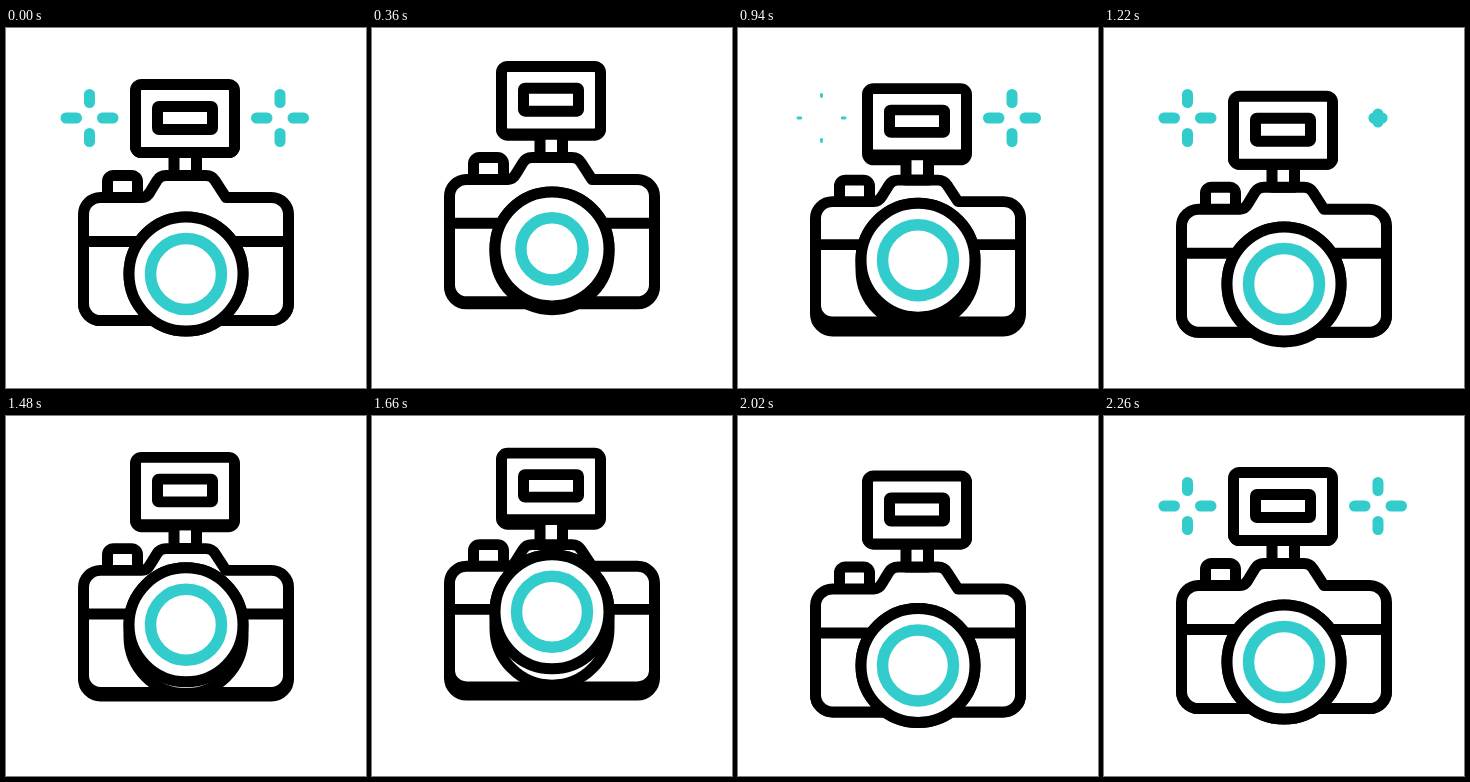
An HTML page with a canvas that plays this animation: 360 by 360 pixels, repeating every 2.42 s.

```html
<!DOCTYPE html>
<html lang="en">
<head>
<meta charset="utf-8">
<title>Camera</title>
<style>
  html, body { margin: 0; height: 100%; overflow: hidden; background: #fff; }
  canvas { display: block; width: 100vmin; height: 100vmin; }
</style>
</head>
<body>
<canvas width="360" height="360"></canvas>
<script>
const ctx = document.querySelector('canvas').getContext('2d');
const LOOP = 2420, TEAL = '#33cccc', STROKE = 11;

// Keys are [time, value] pairs.
const lift = [[0, 0], [360, -18], [540, -35], [600, -37], [680, -33], [940, 4], [1150, 14],
  [1480, -15], [1585, -26], [1640, -22], [1820, 7], [1900, 7], [2140, 0], [LOOP, 0]];
const depth = [[0, 0], [360, 2], [540, 18], [660, 25], [680, 25], [940, 9], [1150, 0],
  [1480, 3.5], [1590, 9], [1820, 4], [1960, 0], [LOOP, 0]];
const zoom = [[0, 0], [360, 7], [540, 36], [660, 50], [680, 50], [940, 18], [1150, 0],
  [1480, 22], [1600, 34], [1820, 12], [1960, 0], [LOOP, 0]];
const focus = [[0, 35.5], [340, 31], [540, 35.5], [LOOP, 35.5]];
const flash = [[0, 0], [580, 0], [700, 1], [730, 1], [840, 0], [LOOP, 0]];

// Each burst is [start, end].
const leftBursts = [[-500, 40], [656, 860], [1080, 1240], [2040, 9999]];
const rightBursts = [[-500, 40], [800, 1000], [1200, 1360], [2040, 9999]];

const clamp = x => Math.min(1, Math.max(0, x));

// Cubic interpolation that stays flat at peaks and holds.
function sample(keys, t) {
  const i = Math.max(1, keys.findIndex(k => k[0] >= t));
  const slope = j => {
    if (j < 1 || j > keys.length - 2) return 0;
    const [a, b, c] = [keys[j - 1], keys[j], keys[j + 1]];
    const before = (b[1] - a[1]) / (b[0] - a[0]), after = (c[1] - b[1]) / (c[0] - b[0]);
    return before * after > 0 ? 2 * before * after / (before + after) : 0;
  };
  const [t0, v0] = keys[i - 1], [t1, v1] = keys[i];
  const span = t1 - t0, u = (t - t0) / span, w = 1 - u;
  return v0 * (1 + 2 * u) * w * w + slope(i - 1) * span * u * w * w
    + v1 * u * u * (3 - 2 * u) - slope(i) * span * u * u * w;
}

function paint(path, color = '#000', fill = '#fff', width = STROKE) {
  ctx.lineWidth = width;
  ctx.strokeStyle = color;
  ctx.beginPath();
  path();
  if (fill) {
    ctx.fillStyle = fill;
    ctx.fill();
  }
  ctx.stroke();
}

function box(left, top, right, bottom, radius, color) {
  paint(() => ctx.roundRect(left, top, right - left, bottom - top, radius), color);
}

function line(x1, y1, x2, y2, color, width) {
  paint(() => { ctx.moveTo(x1, y1); ctx.lineTo(x2, y2); }, color, null, width);
}

function squash(top, offset, scale, draw) {
  ctx.save();
  ctx.translate(0, top + offset);
  ctx.scale(1, scale);
  ctx.translate(0, -top);
  draw();
  ctx.restore();
}

function bodyPath() {
  ctx.moveTo(95, 169.5);
  ctx.lineTo(136, 169.5);
  ctx.quadraticCurveTo(141, 169.5, 144, 164);
  ctx.lineTo(151, 152.5);
  ctx.quadraticCurveTo(154, 147.5, 160, 147.5);
  ctx.lineTo(200, 147.5);
  ctx.quadraticCurveTo(206, 147.5, 209, 152.5);
  ctx.lineTo(220, 169.5);
  ctx.lineTo(265, 169.5);
  ctx.arcTo(282.5, 169.5, 282.5, 187, 17);
  ctx.arcTo(282.5, 292.5, 265, 292.5, 17);
  ctx.arcTo(77.5, 292.5, 77.5, 275, 17);
  ctx.arcTo(77.5, 169.5, 95, 169.5, 17);
  ctx.closePath();
}

function drawBody(y, e) {
  const scale = 1 - e * 0.0024;
  const bottom = 169.5 + y + 123 * scale;
  box(77.5, 195 + y, 282.5, bottom + e, 17);
  squash(169.5, y, scale, () => {
    box(101.5, 147.5, 131.5, 172, [6, 6, 0, 0]);
    paint(bodyPath);
    line(77.5, 213.5, 282.5, 213.5);
  });
}

function drawFlash(y, e, glow) {
  const scale = 1 - e * 0.003;
  const bottom = 56.5 + y + 68 * scale;
  box(129.5, 80 + y, 230 - 1.5, bottom + e * 0.56, 6);
  box(168, bottom, 190.5, 147.5 + y + e * 0.05, 0);
  squash(56.5, y, scale, () => {
    box(129.5, 56.5, 228.5, 124.5, 6);
    const color = `rgb(${51 * glow},${204 * glow},${204 * glow})`;
    box(151.5, 78.5, 206.5, 101.5, 1.5, color);
  });
}

function drawLens(y, z, radius) {
  const front = 246 + y - z, back = front + z * 0.53;
  paint(() => {
    ctx.arc(180, front, 57, Math.PI, 0);
    ctx.arc(180, back, 57, 0, Math.PI);
    ctx.closePath();
  });
  paint(() => ctx.arc(180, front, 57, 0, 7));
  paint(() => ctx.arc(180, front, radius, 0, 7), TEAL, null, 11.5);
}

function drawSparkle(x, y, bursts, t) {
  for (const [start, end] of bursts) {
    const grow = clamp((t - start) / 120), fade = clamp((t - end) / 110);
    if (!grow || fade === 1) continue;
    const arm = (dx, dy, inner, outer) => {
      const from = (inner + (outer - inner) * fade) * grow, to = outer * grow;
      line(x + dx * from, y + dy * from, x + dx * to, y + dy * to, TEAL, STROKE * (1 - fade));
    };
    for (const side of [-1, 1]) {
      arm(side, 0, 13, 23.5);
      arm(0, side, 15.5, 23.5);
    }
  }
}

function render(now) {
  const t = now % LOOP;
  const y = sample(lift, t), e = sample(depth, t);
  ctx.clearRect(0, 0, 360, 360);
  ctx.lineCap = ctx.lineJoin = 'round';
  drawSparkle(83.5, 90, leftBursts, t);
  drawSparkle(274, 90, rightBursts, t);
  drawBody(y, e);
  drawFlash(y, e, sample(flash, t));
  drawLens(y, sample(zoom, t), sample(focus, t));
}

const begin = performance.now();
function tick() {
  render(performance.now() - begin);
  requestAnimationFrame(tick);
}
tick();
</script>
</body>
</html>
```
